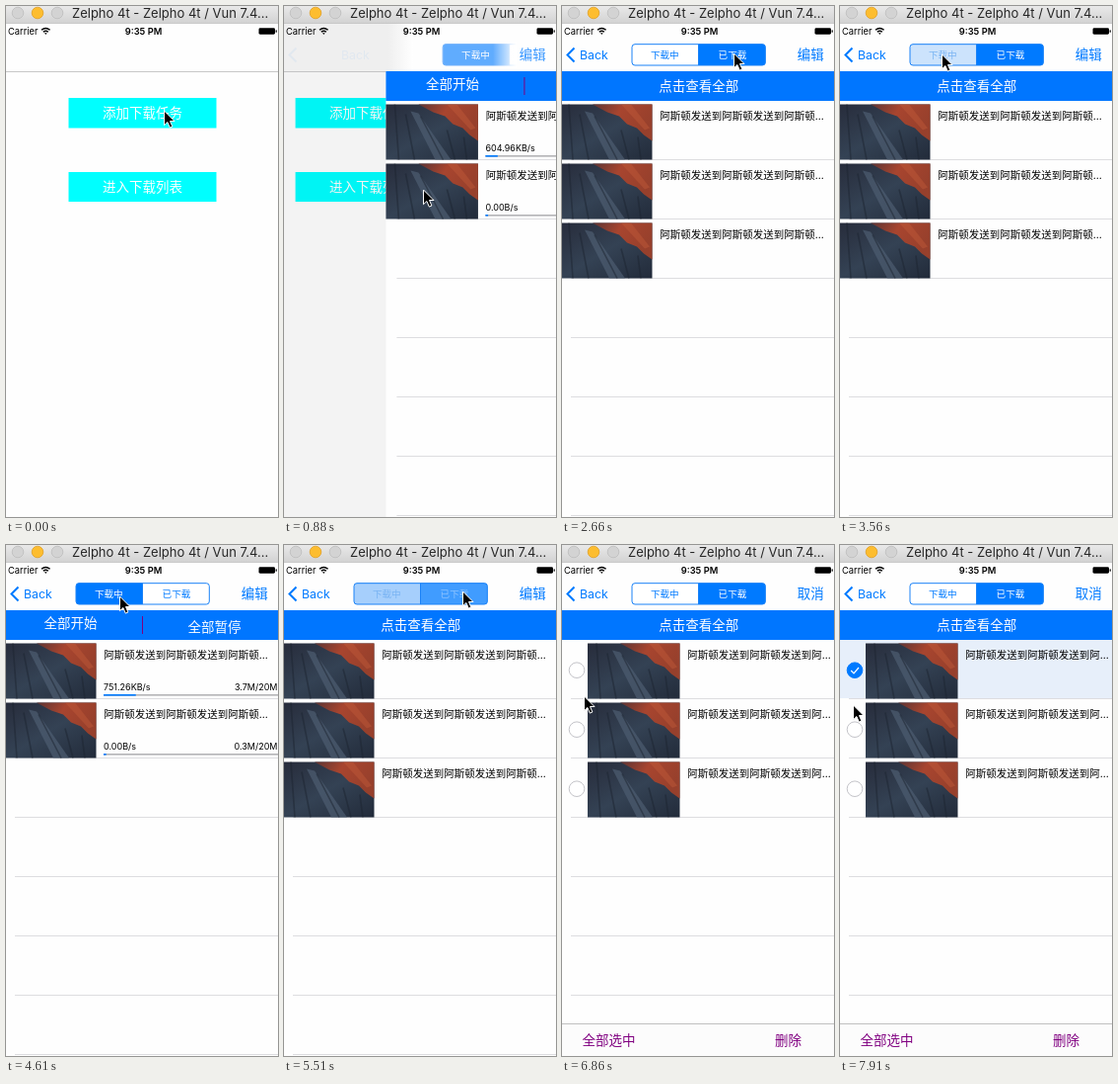
An HTML page that plays this animation: 276 px wide and 517 px high, repeating every 8000 ms.

```html
<!DOCTYPE html>
<html lang="zh-CN">
<head>
<meta charset="utf-8">
<title>Download list</title>
<style>
  html, body { margin: 0; width: 100%; height: 100%; overflow: hidden; background: #fff; }
  svg { display: block; width: 100vw; height: 100vh; }
  text { font-family: Inter, "Noto Sans CJK SC", "Noto Sans CJK", sans-serif; font-size: 13.5px; white-space: pre; }
  .mid { text-anchor: middle; }
  .end { text-anchor: end; }
  .light { font-weight: 300; fill: #fff; }
  .white { fill: #fff; }
  .blue { fill: #007aff; }
  .purple { fill: #800080; }
  .small { font-size: 9px; }
  .seg { font-size: 9.6px; text-anchor: middle; }
  .title { font-size: 10.5px; }
</style>
</head>
<body>
<svg viewBox="0 0 276 517" preserveAspectRatio="none">
  <defs>
    <linearGradient id="chrome" x2="0" y2="1">
      <stop stop-color="#e9e9e9"/><stop offset="1" stop-color="#d2d2d2"/>
    </linearGradient>
    <linearGradient id="edge"><stop stop-color="#efefef"/><stop offset="1" stop-color="#fff"/></linearGradient>
    <linearGradient id="veil"><stop stop-color="#fff" stop-opacity="0"/><stop offset="1" stop-color="#fff"/></linearGradient>
    <linearGradient id="slate" x2="1" y2="1">
      <stop stop-color="#272c3b"/><stop offset=".5" stop-color="#344254"/><stop offset="1" stop-color="#222b3a"/>
    </linearGradient>
    <linearGradient id="rust" x2="1" y2=".4">
      <stop stop-color="#5c3434"/><stop offset=".45" stop-color="#a8452f"/><stop offset="1" stop-color="#97402c"/>
    </linearGradient>
    <clipPath id="segClip"><rect x="71" y="38.5" width="135.5" height="21.5" rx="3"/></clipPath>
    <g id="thumb">
      <rect width="93.5" height="56" fill="url(#slate)"/>
      <path d="M33 0H93.5V37L85 31 78 24 68 20 60 12 48 8Z" fill="url(#rust)"/>
      <path d="M62 0H72L91 24 86 26Z" fill="#c05a3a" opacity=".45"/>
      <path d="M25 7 33 9 66 56H50Z" fill="#4d5d71" opacity=".7"/>
      <path d="M9 0 13 56M20 10 29 56M35 12 58 56M62 26 70 56M79 33 82 56" fill="none" stroke="#1c2431" stroke-width="1.6" opacity=".5"/>
    </g>
  </defs>

  <rect width="276" height="517" fill="#fefefe"/>

  <g id="home">
    <rect x="63.5" y="93" width="150" height="30.5" fill="#0ff"/>
    <rect x="63.5" y="168" width="150" height="30" fill="#0ff"/>
    <text class="light mid" x="138.5" y="112.5">添加下载任务</text>
    <text class="light mid" x="138.5" y="187.5">进入下载列表</text>
  </g>
  <rect id="dim" y="66" width="276" height="451"/>
  <rect y="66" width="276" height=".8" fill="#b9b9bb"/>

  <g id="page">
    <rect x="-2" y="66" width="280" height="451" fill="#fefefe"/>
    <g id="lines" stroke="#dddde0"></g>
    <g id="rows"></g>
    <rect x="-2" y="66" width="280" height="30" fill="#0076ff"/>
    <g id="activeHead">
      <text class="white mid" x="65.5" y="83.5">全部开始</text>
      <text class="white mid" x="211.5" y="88">全部暂停</text>
      <rect x="138" y="72" width="1" height="18" fill="#800080"/>
    </g>
    <text id="doneHead" class="white mid" x="138.8" y="85.5">点击查看全部</text>
    <g id="toolbar">
      <rect y="484" width="276" height="33" fill="#fcfcfc"/>
      <rect y="484" width="276" height=".8" fill="#b2b2b2"/>
      <text class="purple" x="20.5" y="505.8">全部选中</text>
      <text class="purple" x="216" y="505.8">删除</text>
    </g>
  </g>

  <rect y="17" width="276" height="49" fill="#fefefe"/>
  <g id="navShade">
    <rect x="-280" y="17" width="281" height="49" fill="#efefef"/>
    <rect y="17" width="26" height="49" fill="url(#edge)"/>
  </g>
  <path id="chevron" d="M12.5 42.5 5.5 49.5 12.5 56.5" fill="none" stroke="#007aff" stroke-width="2"/>
  <text id="back" class="blue" x="18" y="54" style="font-size:12.3px">Back</text>
  <g id="segments">
    <g clip-path="url(#segClip)">
      <rect id="leftFill" x="71" y="38" width="68" height="23"/>
      <rect id="rightFill" x="138.5" y="38" width="69" height="23"/>
    </g>
    <rect x="71" y="38.7" width="135.3" height="21.3" rx="3" fill="none" stroke="#1a82f7"/>
    <rect x="138" y="39" width="1" height="21" fill="#1a82f7"/>
    <text id="leftText" class="seg" x="104.3" y="52.7">下载中</text>
    <text id="rightText" class="seg" x="173" y="52.7">已下载</text>
  </g>
  <g id="navVeil">
    <rect x="212" y="36" width="24" height="27" fill="url(#veil)"/>
    <rect x="236" y="36" width="40" height="27" fill="#fefefe"/>
  </g>
  <text id="edit" class="blue" x="238.7" y="53.7">编辑</text>

  <rect width="276" height="17.5" fill="url(#chrome)"/>
  <rect y="17" width="276" height=".6" fill="#b8b8b8"/>
  <g fill="#d3d3d3" stroke="#bdbdbd" stroke-width=".8">
    <circle cx="12" cy="7" r="5.8"/>
    <circle cx="32" cy="7" r="5.8" fill="#fdbd2f" stroke="#e0a025"/>
    <circle cx="52" cy="7" r="5.8"/>
  </g>
  <text x="67" y="12" fill="#262626" style="font-size:13px">Zelpho 4t - Zelpho 4t / Vun 7.4...</text>
  <text x="2" y="29" style="font-size:9.3px">Carrier</text>
  <text class="mid" x="139.5" y="29" style="font-size:9.3px;font-weight:600">9:35 PM</text>
  <g fill="none" stroke="#000" stroke-width="1.4">
    <path d="M36 24.3Q40.3 20.6 44.6 24.3M37.8 26.3Q40.3 24.2 42.8 26.3"/>
    <path d="M39 27.3h2.6L40.3 28.9Z" fill="#000" stroke="none"/>
  </g>
  <rect x="256.5" y="22.3" width="16.5" height="6.4" rx="1.4"/>
  <rect x="273.6" y="24.2" width="1.2" height="2.6" rx=".6"/>

  <path id="cursor" d="M.5 0V14.7L3.9 11.5 6.3 17.1 8.9 16 6.5 10.5H11Z" stroke="#fff" stroke-width="1"/>
</svg>
<script>
const LOOP = 8000;
const BLUE = '#007aff', WHITE = '#fff';
const $ = id => document.getElementById(id);

// Each table holds [start ms, ...values]; values stay until the next entry.
const cursorSteps = [
  [0, 160, 106], [140, 158, 118], [290, 150, 150], [440, 143, 178], [590, 141, 186],
  [1470, 147, 150], [1620, 158, 110], [1770, 168, 76], [1920, 172, 58], [2070, 174, 51], [2220, 174, 48],
  [2810, 168, 50], [2960, 150, 52], [3110, 128, 52], [3260, 112, 50], [3410, 103, 49],
  [4010, 105, 50], [4160, 108, 51], [4610, 115, 52], [4760, 136, 51], [4910, 157, 50], [5060, 173, 48], [5210, 181, 47],
  [5660, 190, 46], [5810, 214, 46], [5960, 238, 47], [6110, 245, 48],
  [6710, 140, 95], [6860, 22, 153], [7010, 14, 128],
  [7310, 40, 330], [7460, 130, 470], [7610, 229, 487], [7760, 14, 128], [7910, 13, 162]
];
const pushSteps = [[0, 0], [880, .618], [1030, .93], [1180, .99], [1320, 1]];
const segmentSteps = [
  [0, 'active'], [2370, 'pressRight'], [2520, 'toDone'], [2660, 'done'],
  [3560, 'pressLeft'], [3710, 'toActive'], [3860, 'active'],
  [5360, 'pressRight'], [5510, 'toDone'], [5660, 'done']
];
const listSteps = [[0, 'active'], [2520, 'done'], [3710, 'active'], [5510, 'done']];
const statSteps = [
  [0, '604.96', 1.4], [1320, '755.72', 1.7], [1770, '718.35', 2.1], [2220, '742.08', 2.4],
  [3710, '736.41', 3.4], [4160, '751.26', 3.7], [4910, '724.53', 4.2]
];
const editSteps = [[0, 0], [6260, .45], [6410, .88], [6560, 1]];
const selectSteps = [[0, false], [7160, true]];

// left fill, left text, right fill, right text
const segmentLooks = {
  active: [BLUE, WHITE, WHITE, BLUE],
  done: [WHITE, BLUE, BLUE, WHITE],
  pressLeft: ['#cce3fc', '#78b3f3', BLUE, WHITE],
  pressRight: [BLUE, WHITE, '#cce3fc', '#78b3f3'],
  toDone: ['#a6cffc', '#78b3f3', '#409cff', '#8dc3ff'],
  toActive: ['#409cff', '#8dc3ff', '#a6cffc', '#78b3f3']
};

const at = (steps, t) => steps.findLast(step => step[0] <= t).slice(1);
const move = (id, x, y = 0) => $(id).setAttribute('transform', `translate(${x} ${y})`);
const fade = (id, value) => $(id).setAttribute('opacity', value);
const show = (node, on) => node.setAttribute('visibility', on ? 'visible' : 'hidden');

for (let y = 155.5; y < 517; y += 60)
  $('lines').innerHTML += `<path d="M9 ${y}H278"/>`;

const rows = [0, 1, 2].map(i => {
  const row = document.createElementNS('http://www.w3.org/2000/svg', 'g');
  row.setAttribute('transform', `translate(0 ${96 + i * 60})`);
  row.innerHTML = `
    <rect class="tint" x="-2" width="280" height="59" fill="#e7effa"/>
    <g class="check">
      <circle cx="15" cy="30.7" r="7.8" fill="#fff" stroke="#c4c4c9"/>
      <path d="M11.2 31 14 33.8 19 28" fill="none" stroke="#fff" stroke-width="1.2"/>
    </g>
    <g class="content">
      <use href="#thumb" x="-2" y="3.5"/>
      <text class="title" x="99.3" y="18.8"></text>
    </g>
    <g class="stats">
      <text class="small speed" x="99" y="51.3"></text>
      <text class="small end size" x="275.5" y="51.3"></text>
      <rect x="99" y="55" width="179" height="1.6" fill="#b4b4b6"/>
      <rect class="bar" x="99" y="55" height="1.6" fill="#007aff"/>
    </g>`;
  $('rows').append(row);
  const part = name => row.querySelector('.' + name);
  return { row, part };
});

function drawRow({ row, part }, i, { active, edit, selected, speed, size }) {
  const on = selected && i === 0;
  row.style.display = active && i === 2 ? 'none' : '';
  show(part('tint'), on);
  part('check').setAttribute('opacity', edit);
  const disc = part('check').firstElementChild;
  disc.setAttribute('fill', on ? BLUE : WHITE);
  disc.setAttribute('stroke', on ? BLUE : '#c4c4c9');
  part('content').setAttribute('transform', `translate(${28 * edit} 0)`);
  part('title').textContent = '阿斯顿发送到'.repeat(3).slice(0, edit ? 13 : 15) + '...';
  part('stats').style.display = active ? '' : 'none';
  const loaded = i ? .3 : size;
  part('speed').textContent = (i ? '0.00B' : speed + 'KB') + '/s';
  part('size').textContent = loaded.toFixed(1) + 'M/20M';
  part('bar').setAttribute('width', loaded / 20 * 177);
}

function draw(t) {
  const [x, y] = at(cursorSteps, t);
  const [push] = at(pushSteps, t);
  const [edit] = at(editSteps, t);
  const [selected] = at(selectSteps, t);
  const [speed, size] = at(statSteps, t);
  const active = at(listSteps, t)[0] === 'active';
  const offset = 276 * (1 - push);

  move('cursor', x, y);
  move('home', -84 * push);
  fade('dim', .07 * push);
  move('page', push ? offset : 300);

  const moving = push > 0 && push < 1;
  show($('navShade'), moving);
  move('navShade', offset);
  fade('chevron', push ** 6);
  fade('back', push ** 6);
  move('back', offset * .38);
  fade('segments', push);
  move('segments', 236 * (1 - push));
  fade('navVeil', moving ? Math.min(1, 3 * (1 - push)) : 0);
  fade('edit', Math.sqrt(push));
  $('edit').textContent = edit ? '取消' : '编辑';

  const look = segmentLooks[at(segmentSteps, t)[0]];
  ['leftFill', 'leftText', 'rightFill', 'rightText'].forEach((id, i) => $(id).setAttribute('fill', look[i]));

  show($('activeHead'), active);
  show($('doneHead'), !active);
  move('toolbar', 0, 34 * (1 - edit));
  rows.forEach((row, i) => drawRow(row, i, { active, edit, selected, speed, size }));
}

const start = performance.now();
function tick() {
  draw((performance.now() - start) % LOOP);
  requestAnimationFrame(tick);
}
tick();
</script>
</body>
</html>
```
